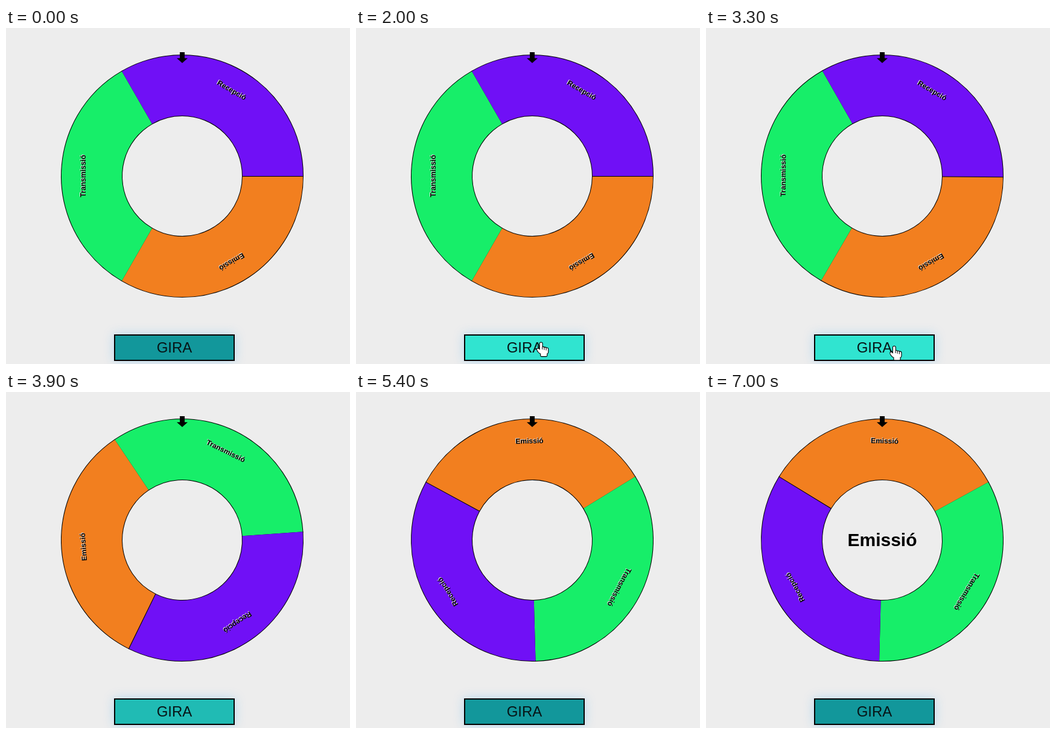
Animation of 570x556 px, one loop 7100 ms. Source, as an HTML page with a canvas:

```html
<!DOCTYPE html>
<html lang="ca">
<head>
<meta charset="utf-8">
<title>Ruleta</title>
<style>
  html, body { margin: 0; width: 570px; height: 556px; overflow: hidden; background: #ededed; }
  canvas { display: block; }
</style>
</head>
<body>
<canvas id="stage" width="570" height="556"></canvas>
<script>
const ctx = document.getElementById('stage').getContext('2d');
const FONT = '"Liberation Sans", Arial, Helvetica, sans-serif';
const LOOP = 7100, STEP = 100;
const CX = 292, CY = 245, OUTER = 200, INNER = 100, LABEL = 160;
const ARC = Math.PI * 2 / 3;
const SPIN = { start: 2335, length: 3993, power: 3.6, degrees: 571.4 };
const RESULT_AT = 6600;
const HOVER = { enter: 450, leave: 3640, fade: 500 };
const CLICK = { from: 2400, to: 2800, x: 305.5, y: 523 };
const BUTTON = { x: 180, y: 508, w: 198, h: 42 };

const segments = [
  { text: 'Emissió', color: '#f27f1f' },
  { text: 'Transmissió', color: '#17ee69' },
  { text: 'Recepció', color: '#7010f6' }
];

const progress = (t, from, length) => Math.min(1, Math.max(0, (t - from) / length));
const smooth = v => v * v * (3 - 2 * v);
const mix = (a, b, k) => Math.round(a + (b - a) * k);

function wheelAngle(t) {
  const left = 1 - progress(t, SPIN.start, SPIN.length);
  return SPIN.degrees * (1 - left ** SPIN.power) * Math.PI / 180;
}

function hoverAmount(t) {
  const fade = from => smooth(progress(t, from, HOVER.fade));
  return fade(HOVER.enter) - fade(HOVER.leave);
}

// Slides in from the right, drifts over the button, drops out below.
function pointerAt(t) {
  const away = (1 - progress(t, 100, 700)) ** 2;
  const drift = progress(t, 1100, 1600);
  const drop = progress(t, 3100, 800) ** 2;
  return { x: 300 + 12 * drift + 285 * away, y: 517 + 5.5 * drift - 30 * away + 60 * drop };
}

function fillCentred(text, x, y, font, color = '#000') {
  ctx.font = `${font} ${FONT}`;
  ctx.fillStyle = color;
  ctx.fillText(text, x - ctx.measureText(text).width / 2, y);
}

function drawLabel(text, angle) {
  ctx.save();
  ctx.shadowOffsetX = ctx.shadowOffsetY = -1;
  ctx.shadowColor = 'rgb(220,220,220)';
  ctx.translate(CX + Math.cos(angle) * LABEL, CY + Math.sin(angle) * LABEL);
  ctx.rotate(angle + Math.PI / 2);
  fillCentred(text, 0, 0, 'bold 12px');
  ctx.restore();
}

function drawWheel(rotation) {
  ctx.strokeStyle = '#000';
  ctx.lineWidth = 2;
  segments.forEach(({ text, color }, i) => {
    const a = rotation + i * ARC;
    ctx.beginPath();
    ctx.arc(CX, CY, OUTER, a, a + ARC);
    ctx.arc(CX, CY, INNER, a + ARC, a, true);
    ctx.stroke();
    ctx.fillStyle = color;
    ctx.fill();
    drawLabel(text, a + ARC / 2);
  });
}

function drawMarker() {
  const top = CY - OUTER;
  ctx.fillStyle = '#000';
  ctx.fillRect(CX - 4, top - 5, 8, 10);
  ctx.beginPath();
  ctx.moveTo(CX - 9, top + 5);
  ctx.lineTo(CX + 9, top + 5);
  ctx.lineTo(CX, top + 13);
  ctx.fill();
}

function drawButton(hover) {
  const { x, y, w, h } = BUTTON;
  ctx.save();
  ctx.shadowColor = 'rgba(165,210,240,0.8)';
  ctx.shadowBlur = 17;
  ctx.fillStyle = '#000';
  ctx.fillRect(x - 1, y - 1, w + 2, h + 2);
  ctx.restore();
  ctx.fillStyle = `rgb(${mix(18, 48, hover)},${mix(151, 228, hover)},${mix(155, 208, hover)})`;
  ctx.fillRect(x + 1, y + 1, w - 2, h - 2);
  fillCentred('GIRA', x + w / 2, 537, '24px', '#071416');
}

function drawClick() {
  ctx.beginPath();
  ctx.arc(CLICK.x, CLICK.y, 5.2, 0, Math.PI * 2);
  ctx.strokeStyle = '#cf3a2c';
  ctx.lineWidth = 2.5;
  ctx.stroke();
}

function drawHand() {
  const knuckle = i => 7 + i * 0.8;
  ctx.beginPath();
  for (let i = 0; i < 4; i++) {
    const top = i ? knuckle(i) : 0.5;
    ctx.roundRect(i * 3.2 - 2, top, 3.8, 18 - top, 1.8);
  }
  ctx.roundRect(-2, 10, 13.4, 9, 3);
  ctx.roundRect(-0.5, 15, 10, 8, 1);
  ctx.ellipse(-3, 14.5, 2, 5, -0.7, 0, Math.PI * 2);
  ctx.lineWidth = 2.2;
  ctx.stroke();
  ctx.fill();
  ctx.beginPath();
  for (let i = 1; i < 4; i++) {
    ctx.moveTo(i * 3.2 - 1.2, knuckle(i));
    ctx.lineTo(i * 3.2 - 1.2, knuckle(i) + 4);
  }
  ctx.lineWidth = 1;
  ctx.stroke();
}

function drawArrow() {
  ctx.beginPath();
  ctx.moveTo(0, 0);
  ctx.lineTo(0, 16);
  ctx.lineTo(4, 12);
  ctx.lineTo(11, 11);
  ctx.closePath();
  ctx.lineWidth = 2;
  ctx.stroke();
  ctx.fill();
}

function drawPointer({ x, y }) {
  const overButton = x < BUTTON.x + BUTTON.w && y < BUTTON.y + BUTTON.h;
  ctx.save();
  ctx.translate(x, y);
  ctx.strokeStyle = '#000';
  ctx.fillStyle = '#fff';
  if (overButton) drawHand();
  else drawArrow();
  ctx.restore();
}

function draw(t) {
  ctx.fillStyle = '#ededed';
  ctx.fillRect(0, 0, 570, 556);
  drawWheel(wheelAngle(t));
  drawMarker();
  if (t >= RESULT_AT) fillCentred(segments[0].text, CX, CY + 10, 'bold 30px');
  drawButton(hoverAmount(t));
  if (t >= CLICK.from && t < CLICK.to) drawClick();
  drawPointer(pointerAt(t));
}

const began = performance.now();
function tick() {
  const t = (performance.now() - began) % LOOP;
  draw(Math.floor(t / STEP) * STEP);
  requestAnimationFrame(tick);
}
tick();
</script>
</body>
</html>
```
